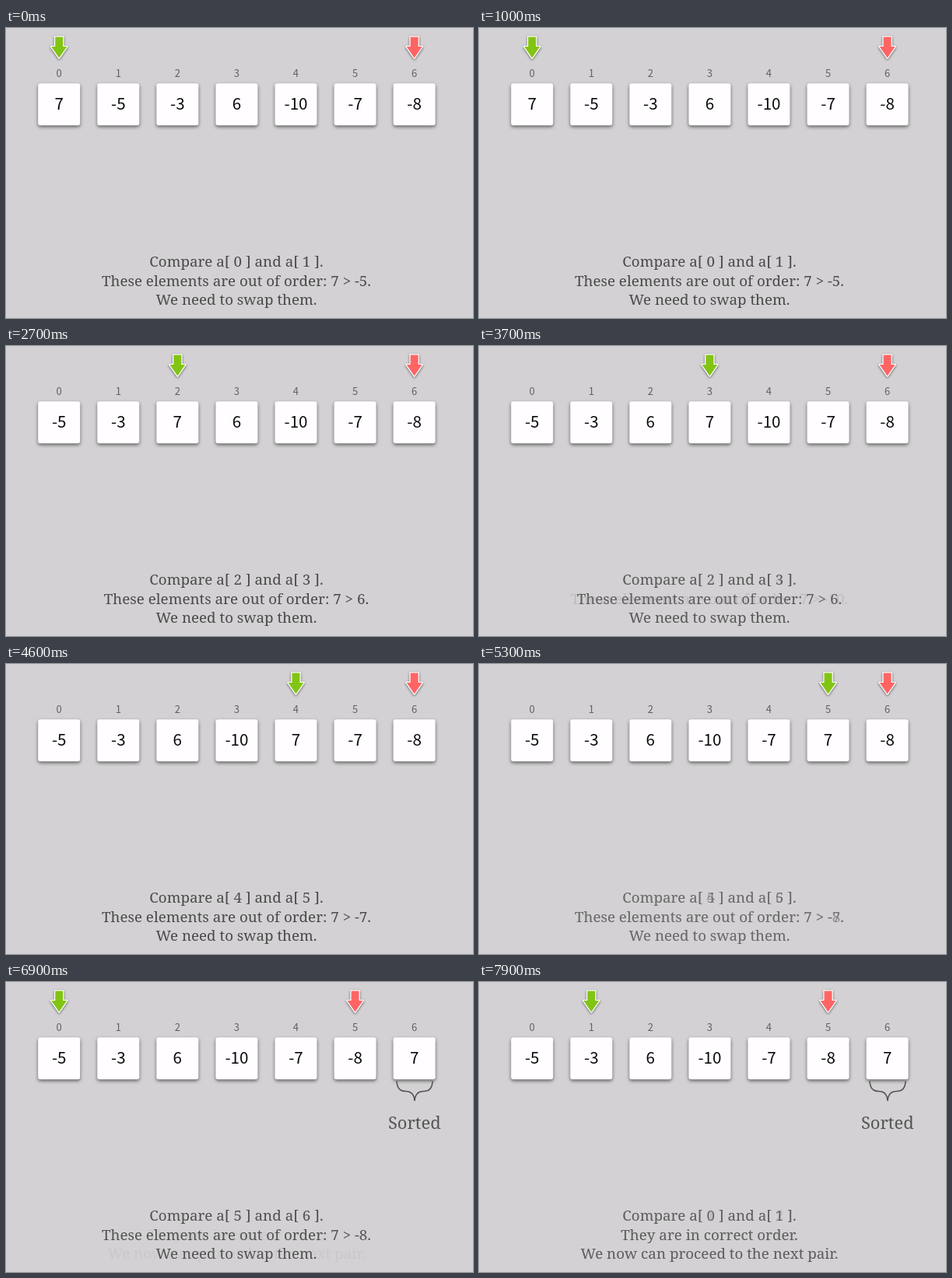
An HTML page for the animation above (8 s loop, 600 by 373 pixels).

```html
<!DOCTYPE html>
<html lang="en">
<head>
<meta charset="utf-8">
<title>Bubble sort</title>
<style>
  html, body { margin: 0; width: 100%; height: 100%; overflow: hidden; background: #d3d1d3; }
  svg { display: block; width: 100vw; height: 100vh; }
  text { text-anchor: middle; }
  .index, .value { font-family: "Noto Sans CJK SC", "Noto Sans CJK JP", "Noto Sans", sans-serif; }
  .index { font-size: 13px; fill: #606060; }
  .value { font-size: 20.6px; fill: #0a0a0a; }
  .card { fill: #fffdff; filter: drop-shadow(0 2px 2px rgba(0, 0, 0, .55)); }
  .caption, .sorted { font-family: "Noto Serif", serif; fill: #4a4a4a; }
  .caption { font-size: 18.8px; }
  .sorted text { font-size: 21.9px; fill: #555; }
  .sorted path { fill: none; stroke: #555; stroke-width: 1.6; stroke-linecap: round; }
  .arrow { stroke: #fff; stroke-width: 2.6; stroke-linejoin: round; paint-order: stroke;
           filter: drop-shadow(0 1.5px 1.5px rgba(0, 0, 0, .55)); }
</style>
</head>
<body>
<svg id="stage" viewBox="0 0 600 373" preserveAspectRatio="none"></svg>
<script>
const LOOP = 8000, MOVE = 290, FADE = 180;
const values = [7, -5, -3, 6, -10, -7, -8];
const swaps = [1060, 2160, 3365, 4060, 4905, 5805];
const reset = 6465, advance = 7555, sortedAt = 6150;
const fades = [...swaps.slice(0, 5).map(s => s + 310), 6890, advance + 310];

const stage = document.getElementById('stage');

function add(parent, tag, attrs, text) {
  const el = document.createElementNS('http://www.w3.org/2000/svg', tag);
  for (const key in attrs) el.setAttribute(key, attrs[key]);
  if (text !== undefined) el.textContent = text;
  parent.appendChild(el);
  return el;
}

const slotX = i => 68.2 + 76.07 * i;

values.forEach((_, i) => add(stage, 'text', { class: 'index', x: slotX(i), y: 62.7 }, i));

// The travelling first tile is added last so that it passes over the others.
const tiles = [];
for (let i = values.length - 1; i >= 0; i--) {
  const g = add(stage, 'g', {});
  add(g, 'rect', { class: 'card', x: -27, y: 71.3, width: 54, height: 54, rx: 3 });
  add(g, 'text', { class: 'value', x: 0, y: 105 }, values[i]);
  tiles[i] = g;
}

const sorted = add(stage, 'g', { class: 'sorted' });
add(sorted, 'path', {
  d: 'M502 128C502.500 137 507 140.500 513 140.500C520 140.500 524.500 144 525 153' +
     'C525.500 144 530 140.500 537 140.500C543 140.500 547.500 137 548 128'
});
add(sorted, 'text', { x: 524.8, y: 188.5 }, 'Sorted');

const arrowShape = 'M-5 11.500H5V24H10L0 38.500L-10 24H-5Z';
const red = add(stage, 'path', { class: 'arrow', d: arrowShape, fill: '#ff6464' });
const green = add(stage, 'path', { class: 'arrow', d: arrowShape, fill: '#82c414' });

function caption(i, lines) {
  const g = add(stage, 'g', { class: 'caption' });
  [`Compare a[ ${i} ] and a[ ${i + 1} ].`, ...lines].forEach((line, n) =>
    add(g, 'text', { x: 296, y: 306.8 + 24.7 * n }, line));
  return g;
}

const inOrder = ['They are in correct order.', 'We now can proceed to the next pair.'];
const captions = [
  ...swaps.map((_, i) => caption(i, [
    `These elements are out of order: 7 > ${values[i + 1]}.`,
    'We need to swap them.'
  ])),
  caption(0, inOrder),
  caption(1, inOrder)
];

const ramp = (t, start, length) => Math.min(1, Math.max(0, (t - start) / length));

function ease(t, start) {
  const u = ramp(t, start, MOVE);
  return u < .5 ? 2 * u * u : 1 - 2 * (1 - u) * (1 - u);
}

const place = (el, slot) => el.setAttribute('transform', `translate(${slotX(slot)} 0)`);

function render(t) {
  const done = swaps.map(s => ease(t, s));
  const sum = list => list.reduce((a, b) => a + b, 0);

  tiles.forEach((tile, i) => place(tile, i ? i - done[i - 1] : sum(done)));

  const back = ease(t, reset);
  place(green, sum(done.slice(0, 5)) - 5 * back + ease(t, advance));
  place(red, 6 - back);
  sorted.setAttribute('opacity', ramp(t, sortedAt, 250));

  captions.forEach((g, i) => {
    const shown = i ? ramp(t, fades[i - 1], FADE) : 1;
    const gone = i < fades.length ? ramp(t, fades[i], FADE) : 0;
    g.setAttribute('opacity', shown - gone);
  });
}

const begin = performance.now();
function tick() {
  render((performance.now() - begin) % LOOP);
  requestAnimationFrame(tick);
}
tick();
</script>
</body>
</html>
```
